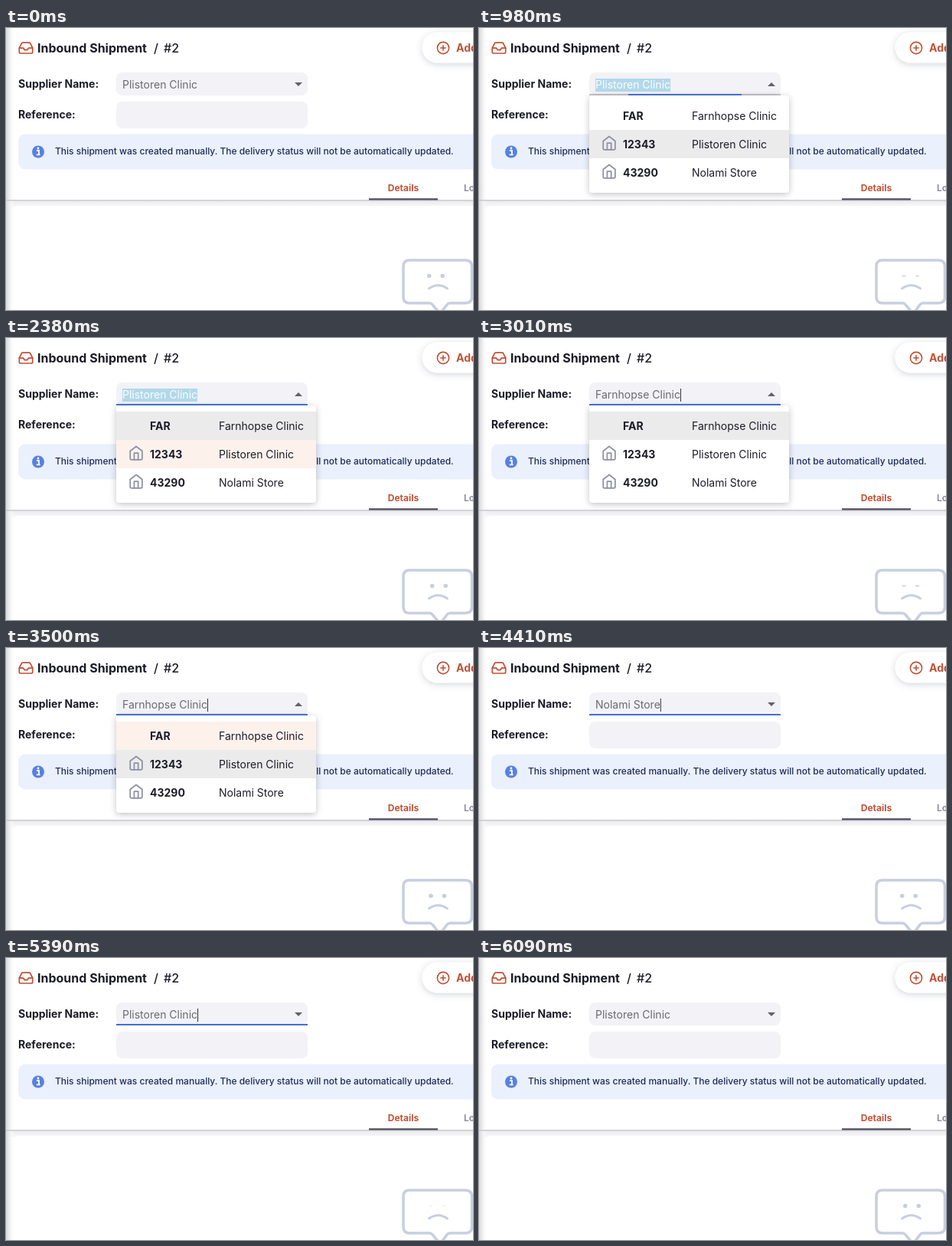
Recreate the animation shown at these times as an HTML page. Size 610 by 368 pixels, loop 6.16 s.

```html
<!DOCTYPE html>
<html lang="en">
<head>
<meta charset="utf-8">
<title>Inbound Shipment</title>
<style>
  html, body { margin: 0; width: 100%; height: 100%; overflow: hidden; background: #fff; }
  svg { display: block; width: 610px; height: 368px; }
  text { font-family: Inter, "Liberation Sans", sans-serif; font-size: 14px; fill: #1c1c28; white-space: pre; }
  .bold { font-weight: 700; }
  .medium { font-weight: 500; }
  .title { font-size: 16px; }
  .small { font-size: 12px; }
  .red { fill: #c15136; }
  .icon { fill: none; stroke-width: 2; stroke-linecap: round; stroke-linejoin: round; }
  .red-line { stroke: #c15136; }
  .bubble { fill: none; stroke: #c7cfe0; stroke-width: 3.6; stroke-linecap: round; }
  .popup { filter: drop-shadow(0 2px 4px rgba(0, 0, 0, .24)); }
</style>
</head>
<body>
<svg viewBox="0 0 610 368">
  <defs>
    <linearGradient id="edge">
      <stop offset="0" stop-color="#d9d9dc"/>
      <stop offset=".45" stop-color="#f0f0f2"/>
      <stop offset="1" stop-color="#fff" stop-opacity="0"/>
    </linearGradient>
    <linearGradient id="under" x2="0" y2="1">
      <stop offset="0" stop-color="#ebebee"/>
      <stop offset="1" stop-color="#f9f9fa"/>
    </linearGradient>
    <filter id="soft" x="-20%" y="-40%" width="140%" height="190%">
      <feDropShadow dx="0" dy="2" stdDeviation="4" flood-color="#555a70" flood-opacity=".26"/>
    </filter>
    <g id="home" class="icon" stroke="#8f90a6">
      <path d="M3 9l9-7 9 7v11a2 2 0 0 1-2 2H5a2 2 0 0 1-2-2z"/>
      <path d="M9 22V12h6v10"/>
    </g>
  </defs>

  <rect width="610" height="368" fill="#fff"/>
  <rect y="225" width="610" height="9" fill="url(#under)"/>
  <path d="M9 368V240q0-8 8-8H610V368z" fill="#fff"/>
  <rect width="11" height="368" fill="url(#edge)"/>
  <rect y="224.2" width="610" height="1.4" fill="#c6c6cc"/>

  <g class="icon red-line" transform="translate(15.6 15.6) scale(.87)">
    <path d="M22 12h-6l-2 3h-4l-2-3H2"/>
    <path d="M5.45 5.11L2 12v6a2 2 0 0 0 2 2h16a2 2 0 0 0 2-2v-6l-3.45-6.89A2 2 0 0 0 16.76 4H7.24a2 2 0 0 0-1.79 1.11z"/>
  </g>
  <text class="title bold" x="41" y="32">Inbound Shipment</text>
  <text class="title medium" x="193" y="32">/</text>
  <text class="title medium" x="206" y="32">#2</text>

  <rect x="543.5" y="5.5" width="110" height="40" rx="20" fill="#fff" filter="url(#soft)"/>
  <g class="icon red-line" style="stroke-width:1.6">
    <circle cx="571" cy="26" r="7.6"/>
    <path d="M571 22.8v6.4M567.8 26h6.4"/>
  </g>
  <text class="bold red" x="588" y="31">Add</text>

  <text class="bold" x="16" y="78">Supplier Name:</text>
  <text class="bold" x="16" y="118">Reference:</text>
  <rect x="144" y="58" width="250" height="30" rx="8" fill="#f2f2f7"/>
  <rect x="144" y="96" width="250" height="35" rx="8" fill="#f2f2f7"/>
  <rect id="selection" x="152" y="66" height="17" fill="#b2d8ea"/>
  <text id="value" x="152" y="79"></text>
  <rect id="caret" y="66" width="1" height="17" fill="#333"/>
  <path id="arrow" fill="#626269"/>

  <rect x="16" y="138.5" width="640" height="46" rx="9" fill="#ebf0fd"/>
  <circle cx="42" cy="161.5" r="8" fill="#5681e0"/>
  <path d="M40 160h3v5.2M39.8 165.4h4.8" fill="none" stroke="#fff" stroke-width="1.8"/>
  <circle cx="42" cy="157" r="1.4" fill="#fff"/>
  <text class="small medium" x="64" y="165" style="fill:#1d2c58">This shipment was created manually. The delivery status will not be automatically updated.</text>

  <text class="small bold red" x="519" y="213" text-anchor="middle">Details</text>
  <text class="small bold" x="598" y="213" style="fill:#8f90a6">Logs</text>
  <rect x="474" y="222.3" width="90" height="2.2" fill="#4b4a5c"/>

  <path class="bubble" d="M553 359H527q-8 0-8-8V311q0-8 8-8H600q8.500 0 8.500 8V351q0 8-8.500 8H580q-2.500 0-4 2L567 373L557 361q-1.500-2-4-2"/>
  <path class="bubble" style="stroke-width:3" d="M552.500 340q12-8.500 24 0"/>
  <g id="eyes" fill="#c7cfe0">
    <ellipse rx="2.8" cy="323.5"/>
    <ellipse rx="2.8" cy="323.5"/>
  </g>

  <g id="popup">
    <rect class="popup" x="144" y="88" width="261" height="127" rx="4" fill="#fff"/>
    <g id="rows"></g>
  </g>
  <rect id="hoverLine" x="144" y="86.5" width="250" height="1" fill="#8b8c94"/>
  <rect id="underline" y="86" height="2" fill="#4670c8"/>
</svg>
<script>
const LOOP = 6160, STEP = 70, EYE_LOOP = 2240;
const byId = id => document.getElementById(id);
const options = [
  { code: "FAR", name: "Farnhopse Clinic" },
  { code: "12343", name: "Plistoren Clinic", home: true },
  { code: "43290", name: "Nolami Store", home: true }
];

// hover: -1 means the pointer is on no row
const states = [
  { at: 0, value: 1 },
  { at: 980, value: 1, open: true, hover: 1 },
  { at: 1820, value: 1, open: true, hover: -1 },
  { at: 1890, value: 1, open: true, hover: 0 },
  { at: 2520, value: 0 },
  { at: 2590, value: 0, open: true, hover: 0 },
  { at: 3430, value: 0, open: true, hover: -1 },
  { at: 3500, value: 0, open: true, hover: 1 },
  { at: 3570, value: 0, open: true, hover: 2 },
  { at: 4410, value: 2 },
  { at: 4480, value: 2, open: true, hover: 2 },
  { at: 4970, value: 2, open: true, hover: -1 },
  { at: 5040, value: 2, open: true, hover: 1 },
  { at: 5110, value: 1 }
];
const FOCUS = 928, BLUR = 5478, FIRST_PICK = 2520;

// left-eye centre through one glance cycle
const glances = [
  { at: 0, x: 552.7 }, { at: 140, x: 556.7 }, { at: 350, x: 558.7 }, { at: 560, x: 555 },
  { at: 1400, x: 552.7 }, { at: 1610, x: 556.7 }, { at: 2170, x: 552.7 }
];
const BLINK_START = 770, blink = [.4, .1, .1, .3];

byId("rows").innerHTML = options.map(({ code, name, home }, i) => {
  const y = 96 + 37 * i;
  return `<rect x="144" y="${y}" width="261" height="37"/>` +
    (home ? `<use href="#home" transform="translate(159.6 ${y + 6.7}) scale(.87)"/>` : "") +
    `<text class="bold" x="188" y="${y + 24}">${code}</text>` +
    `<text x="278" y="${y + 24}">${name}</text>`;
}).join("");
const rowRects = byId("rows").querySelectorAll("rect");
const eyes = byId("eyes").children;

const latest = (list, t) => list.filter(s => s.at <= t).pop();
const show = (el, on) => el.setAttribute("visibility", on ? "visible" : "hidden");

// cubic-bezier(0, 0, .2, 1)
function easeOut(p) {
  if (p <= 0) return 0;
  if (p >= 1) return 1;
  let lo = 0, hi = 1;
  for (let i = 0; i < 20; i++) {
    const s = (lo + hi) / 2;
    if (.6 * (1 - s) * s * s + s ** 3 < p) lo = s; else hi = s;
  }
  return 3 * (1 - lo) * lo * lo + lo ** 3;
}

function drawEyes(t) {
  const phase = t % EYE_LOOP;
  const { x } = latest(glances, phase);
  const lid = blink[(phase - BLINK_START) / STEP] ?? 1;
  [x, x + 17.5].forEach((cx, i) => {
    eyes[i].setAttribute("cx", cx);
    eyes[i].setAttribute("ry", 2.8 * lid);
  });
}

function drawField(t, state) {
  const selected = t >= 980 && t < FIRST_PICK;
  const value = byId("value");
  value.textContent = options[state.value].name;
  value.style.fill = selected ? "#fafdff" : "#6a6a71";
  const width = value.getComputedTextLength();
  byId("selection").setAttribute("width", width);
  show(byId("selection"), selected);
  byId("caret").setAttribute("x", 152 + width);
  show(byId("caret"), t >= FIRST_PICK && t < BLUR);
  byId("arrow").setAttribute("d", state.open ? "M377 76h10l-5-5z" : "M377 71h10l-5 5z");

  const grow = easeOut((t - FOCUS) / 200) - easeOut((t - BLUR) / 200);
  byId("underline").setAttribute("x", 269 - 125 * grow);
  byId("underline").setAttribute("width", 250 * grow);
  show(byId("hoverLine"), t >= 910 && t < 1190);
}

function drawPopup(state) {
  show(byId("popup"), state.open);
  rowRects.forEach((row, i) => row.setAttribute("fill",
    i === state.hover ? "#ebebeb" : i === state.value ? "#fdf1ec" : "#fff"));
}

function render(time) {
  const t = Math.floor((time % LOOP) / STEP) * STEP;
  const state = latest(states, t);
  drawEyes(t);
  drawField(t, state);
  drawPopup(state);
}

const start = performance.now();
(function tick() {
  render(performance.now() - start);
  requestAnimationFrame(tick);
})();
</script>
</body>
</html>
```
